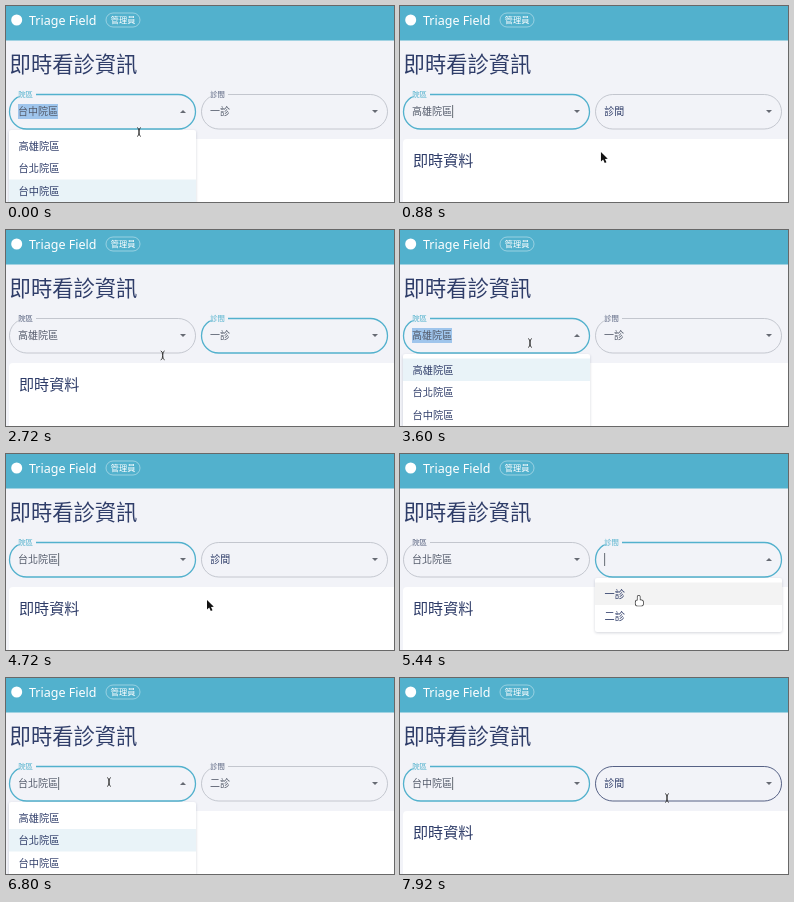
Animation, 388 px wide and 196 px high, one loop 8 s. Source, as an HTML page with a canvas:

```html
<!DOCTYPE html>
<html lang="zh-Hant">
<head>
<meta charset="utf-8">
<style>
  html, body { margin: 0; width: 100%; height: 100%; overflow: hidden; background: #f2f3f8; }
  canvas { display: block; width: 388px; height: 196px; }
</style>
</head>
<body>
<canvas></canvas>
<script>
const W = 388, H = 196, LOOP = 8000, STEP = 80;
const TEAL = '#52b1cd', NAVY = '#2f3d69', INK = '#535a6a', PAGE = '#f2f3f8';
const CJK = '"Noto Sans CJK TC", "Noto Sans CJK", sans-serif';
const FIELD_W = 186, FIELD_TOP = 88.5, FIELD_H = 34.5, FIELD_MID = 105.5;
const MENU_TOP = 124, MENU_W = 187, ROW_TOP = 128.5, ROW_H = 22.5;

const canvas = document.querySelector('canvas');
const ctx = canvas.getContext('2d');
const ratio = window.devicePixelRatio || 1;
canvas.width = W * ratio;
canvas.height = H * ratio;

// linger: share of an open menu's time before the pointer moves; reach: where it picks across the row
const fields = {
  branch: { x: 3.5, label: '院區', options: ['高雄院區', '台北院區', '台中院區'], linger: 0.3, reach: 0.45 },
  room: { x: 195.5, label: '診間', options: ['一診', '二診'], linger: 0, reach: 0.23 }
};

// Each visit opens a field at a point, then picks an option.
const visits = [
  { field: 'branch', open: -80, at: { x: 133, y: 126 }, pick: 400, option: '高雄院區' },
  { field: 'room', open: 1760, at: { x: 230, y: 118 }, pick: 2000, option: '一診' },
  { field: 'branch', open: 3280, at: { x: 130, y: 113 }, pick: 4400, option: '台北院區' },
  { field: 'room', open: 5280, at: { x: 239, y: 118 }, pick: 6000, option: '二診' },
  { field: 'branch', open: 6800, at: { x: 103, y: 104 }, pick: 7520, option: '台中院區' },
  { field: 'room', open: LOOP, at: { x: 267, y: 120 }, pick: LOOP + 240, option: '一診' }
];
const REST = { x: 201, y: 146 };

const mix = (a, b, p) => a + (b - a) * p;
const span = (v, from, to) => Math.min(1, Math.max(0, (v - from) / (to - from)));
const easeOut = (p, power = 2) => 1 - (1 - p) ** power;

function stateAt(t) {
  const state = { branch: '台中院區', room: '一診', focus: null, open: false, since: 0 };
  for (const { field, open, pick, option } of visits) {
    if (open <= t) Object.assign(state, { focus: field, open: true, since: open });
    if (pick <= t) {
      if (field === 'branch') state.room = '';
      Object.assign(state, { [field]: option, open: false, since: pick });
    }
  }
  return state;
}

function optionSpot({ field, option }) {
  const { x, reach, options } = fields[field];
  return { x: x + FIELD_W * reach, y: ROW_TOP + (options.indexOf(option) + 0.5) * ROW_H };
}

function travel(from, to, p) {
  const eased = easeOut(p);
  return { x: mix(from.x, to.x, eased), y: mix(from.y, to.y, eased) };
}

function pointerAt(t) {
  const i = visits.findLastIndex(v => v.open <= t);
  const visit = visits[i], next = visits[i + 1], spot = optionSpot(visit);
  if (t < visit.pick) {
    const share = span(t, visit.open, visit.pick);
    return travel(visit.at, spot, span(share, fields[visit.field].linger, 0.7));
  }
  const share = span(t, visit.pick, next.open);
  return share < 0.4
    ? travel(spot, REST, span(share, 0, 0.36))
    : travel(REST, next.at, span(share, 0.4, 0.82));
}

function text(str, x, centerY, size, color) {
  ctx.font = `${size}px ${CJK}`;
  ctx.fillStyle = color;
  ctx.fillText(str, x, centerY + size * 0.38);
}

function rect(x, y, w, h, color) {
  ctx.fillStyle = color;
  ctx.fillRect(x, y, w, h);
}

function roundRect(x, y, w, h, r) {
  ctx.beginPath();
  ctx.roundRect(x, y, w, h, r);
}

function stroke(color, width) {
  ctx.strokeStyle = color;
  ctx.lineWidth = width;
  ctx.stroke();
}

function polygon(points, color) {
  ctx.beginPath();
  points.forEach(([x, y]) => ctx.lineTo(x, y));
  ctx.closePath();
  ctx.fillStyle = color;
  ctx.fill();
}

function drawPage() {
  rect(0, 0, W, H, PAGE);
  rect(0, 0, W, 34.5, TEAL);
  roundRect(5.2, 8.5, 11, 11, 5.5);
  ctx.fillStyle = '#fff';
  ctx.fill();
  ctx.font = '12.5px "Noto Sans", "Open Sans", sans-serif';
  ctx.fillText('Triage Field', 23, 19);
  roundRect(100, 7, 34, 14, 7);
  stroke('rgba(255,255,255,.5)', 0.8);
  text('管理員', 104.8, 14, 8.2, '#fff');
  text('即時看診資訊', 3.6, 58, 21.3, NAVY);

  roundRect(3, 133, W, H, 4);
  ctx.fillStyle = '#fff';
  ctx.fill();
  text('即時資料', 13, 153.8, 15.1, NAVY);
}

// 0 = resting inside the field, 1 = raised onto its border
function labelLift(name, t, state) {
  const raised = s => Number(s[name] !== '' || (s.open && s.focus === name));
  const p = easeOut(span(t, state.since - 50, state.since + 150), 3);
  return mix(raised(stateAt(state.since - 1)), raised(state), p);
}

function drawField(name, t, state, pointer) {
  const { x, label } = fields[name], value = state[name];
  const focused = state.focus === name, open = focused && state.open;
  const hovered = pointer.x > x && pointer.x < x + FIELD_W &&
    pointer.y > FIELD_TOP && pointer.y < FIELD_TOP + FIELD_H;

  roundRect(x, FIELD_TOP, FIELD_W, FIELD_H, FIELD_H / 2);
  stroke(focused ? TEAL : hovered ? NAVY : '#b8bbc5', focused ? 1.3 : 0.8);

  const lift = labelLift(name, t, state), up = lift > 0.6;
  if (up) rect(x + 6.5, FIELD_TOP - 2, 20 * lift, 4, PAGE);
  const labelColor = !up ? NAVY : focused ? TEAL : '#58627f';
  text(label, x + 8.7, mix(FIELD_MID, 88.3, lift), mix(10, 7.4, lift), labelColor);

  const textX = x + 8.5, width = value.length * 10;
  const selected = open && value && t > state.since;
  if (selected) rect(textX, 98, width, 15, '#9fc5ec');
  text(value, textX, FIELD_MID, 10, INK);
  const caretOn = Math.floor((t - state.since) / 500) % 2 === 0;
  if (focused && !selected && caretOn) rect(textX + width + 0.3, 99, 0.8, 13, '#444a55');

  const tip = open ? -1.5 : 1.5, arrowX = x + 173.5;
  polygon([[arrowX - 3, FIELD_MID - tip], [arrowX + 3, FIELD_MID - tip], [arrowX, FIELD_MID + tip]], '#666a73');
}

function drawMenu(state, pointer) {
  const { x, options } = fields[state.focus], left = x - 0.5;
  ctx.save();
  ctx.shadowColor = 'rgba(40,50,80,.2)';
  ctx.shadowBlur = 3 * ratio;
  ctx.shadowOffsetY = ratio;
  ctx.fillStyle = '#fff';
  roundRect(left, MENU_TOP, MENU_W, options.length * ROW_H + 9, 2);
  ctx.fill();
  ctx.restore();
  options.forEach((option, i) => {
    const y = ROW_TOP + i * ROW_H;
    const hovered = pointer.x > left && pointer.x < left + MENU_W && pointer.y >= y && pointer.y < y + ROW_H;
    if (option === state[state.focus]) rect(left, y, MENU_W, ROW_H, '#e9f3f8');
    else if (hovered) rect(left, y, MENU_W, ROW_H, '#f3f3f3');
    text(option, left + 9.6, y + 11.3, 10.2, NAVY);
  });
}

function drawBeam() {
  ctx.beginPath();
  for (const end of [-4.5, 4.5]) {
    ctx.moveTo(-2, end);
    ctx.quadraticCurveTo(0, end, 0, 0);
    ctx.quadraticCurveTo(0, end, 2, end);
  }
  stroke('#333', 0.9);
}

function drawArrow() {
  polygon([[0, 0], [0, 9.5], [2.2, 7.6], [3.8, 11], [5.5, 10.2], [4, 7], [6.8, 6.8]], '#111');
}

function drawHand() {
  ctx.beginPath();
  ctx.roundRect(-1, 0, 2.2, 7, 1);
  ctx.roundRect(-3, 4.5, 7.5, 5.5, 2);
  stroke('#333', 1.4);
  ctx.fillStyle = '#fff';
  ctx.fill();
}

function drawPointer({ x, y }, state) {
  const menuX = fields[state.focus].x;
  const overMenu = state.open && y >= ROW_TOP && x > menuX && x < menuX + FIELD_W;
  const overField = y > FIELD_TOP && y < ROW_TOP;
  ctx.save();
  ctx.translate(x, y);
  (overField ? drawBeam : overMenu ? drawHand : drawArrow)();
  ctx.restore();
}

function render(elapsed) {
  const t = Math.floor((elapsed % LOOP) / STEP) * STEP;
  const state = stateAt(t), pointer = pointerAt(t);
  ctx.setTransform(ratio, 0, 0, ratio, 0, 0);
  drawPage();
  for (const name in fields) drawField(name, t, state, pointer);
  if (state.open) drawMenu(state, pointer);
  drawPointer(pointer, state);
}

const start = performance.now();
function tick() {
  render(performance.now() - start);
  requestAnimationFrame(tick);
}
tick();
</script>
</body>
</html>
```
